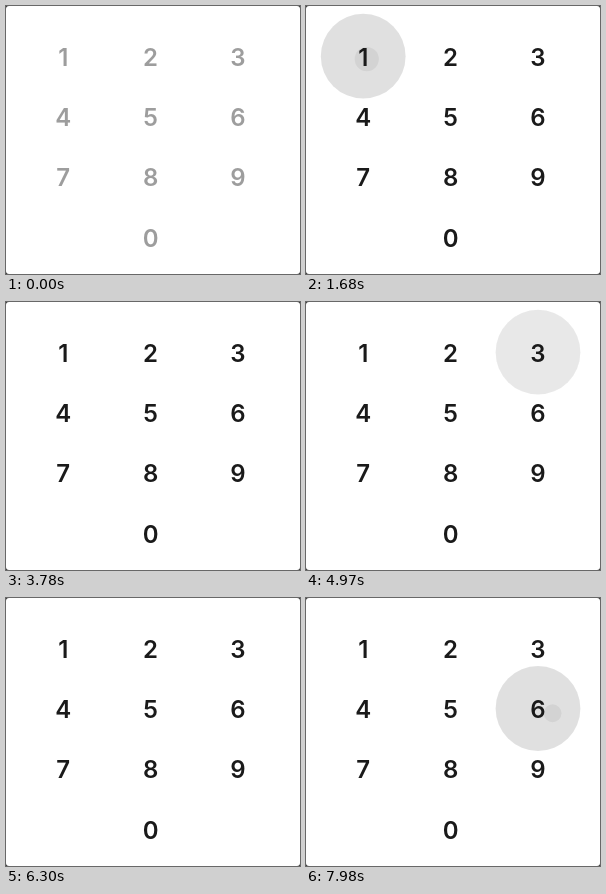
An HTML page with a canvas for the animation above (8000 ms loop, 294x268 px).

```html
<!DOCTYPE html>
<html lang="en">
<head>
<meta charset="utf-8">
<title>Keypad</title>
<style>
  html, body { margin: 0; width: 294px; height: 268px; overflow: hidden; background: #333; }
  canvas { display: block; background: #fff; border-radius: 3px; }
</style>
</head>
<body>
<canvas width="294" height="268"></canvas>
<script>
const ctx = document.querySelector('canvas').getContext('2d');
const LOOP = 8000, RADIUS = 42.4, FADE = 150, GROW = 1050;

// Key, touch time, release time, touch offset from the key centre
const presses = [
  [1, 1380, 2290, 5, 4],
  [2, 2645, 3630, 1, -3],
  [3, 3975, 4895, 2, 2],
  [4, 5375, 6150, -9, 2],
  [5, 6635, 7485, -5, -3],
  [6, 7760, 9000, 18.5, 6],
];

const clamp = v => Math.max(0, Math.min(1, v));
const ramp = (t, start, length) => clamp((t - start) / length);
const keyCentre = key => key
  ? [57.2 + (key - 1) % 3 * 87.4, 50.2 + Math.floor((key - 1) / 3) * 60.3]
  : [144.6, 231.1];

function disc(x, y, r, alpha) {
  ctx.fillStyle = `rgba(0, 0, 0, ${alpha})`;
  ctx.beginPath();
  ctx.arc(x, y, r, 0, 2 * Math.PI);
  ctx.fill();
}

function drawPress(t, [key, down, up, dx, dy]) {
  if (t < down || t > up + FADE) return;
  const [x, y] = keyCentre(key);
  const alpha = ramp(t, down, FADE) * (1 - ramp(t, up, FADE));
  const grown = ramp(t, down, GROW);
  const r = RADIUS * grown + Math.max(0, t - up);
  ctx.save();
  disc(x, y, RADIUS, 0.122 * alpha);
  ctx.clip();
  // The splash drifts to the key centre while it grows
  disc(x + dx * (1 - grown), y + dy * (1 - grown), r, 0.06 * alpha);
  ctx.restore();
}

function drawDigits(t) {
  ctx.globalAlpha = 0.43 - 0.13 * ramp(t, 0, 140) + 0.7 * ramp(t, 680, 220);
  ctx.globalAlpha = Math.min(1, ctx.globalAlpha);
  ctx.fillStyle = '#1a1a1a';
  ctx.font = '600 24px Inter, sans-serif';
  ctx.textAlign = 'center';
  for (let key = 0; key < 10; key++) {
    const [x, y] = keyCentre(key);
    ctx.fillText(key, x, y + 9.5);
  }
  ctx.globalAlpha = 1;
}

function draw() {
  const t = performance.now() % LOOP;
  ctx.clearRect(0, 0, 294, 268);
  presses.forEach(press => drawPress(t, press));
  drawDigits(t);
  requestAnimationFrame(draw);
}
draw();
</script>
</body>
</html>
```
